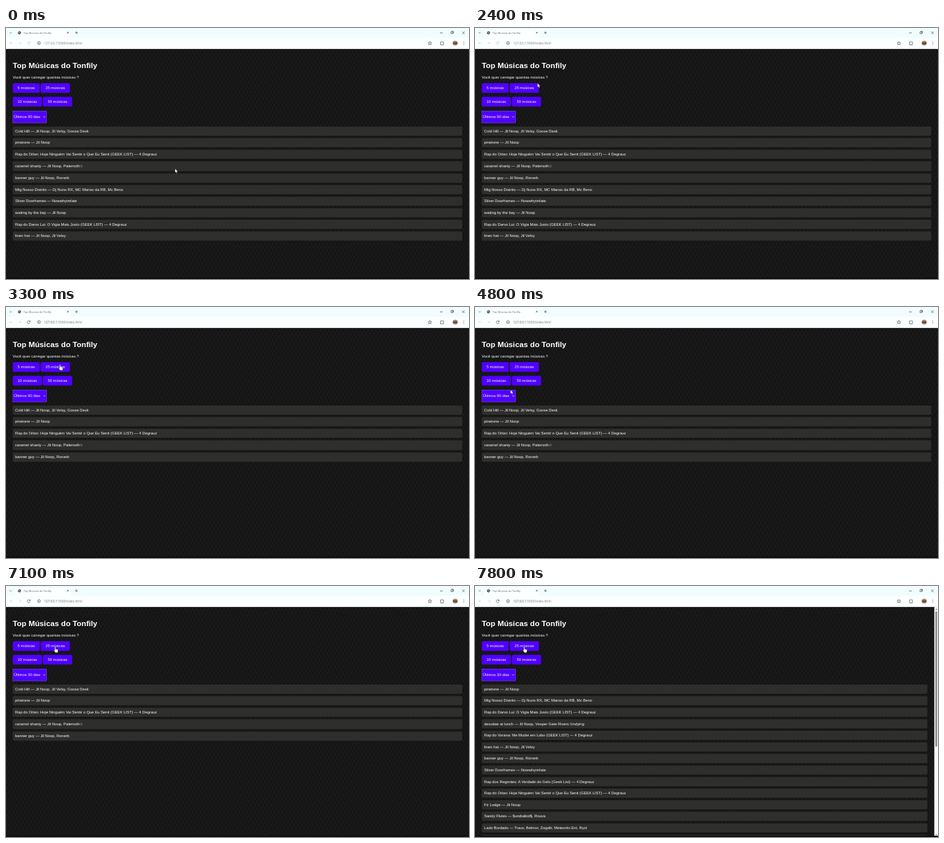
Recreate the animation shown at these times as an HTML page. Size 704 px wide and 382 px high, loop 8000 ms.

```html
<!DOCTYPE html>
<html lang="pt-BR">
<head>
<meta charset="utf-8">
<title>Top Músicas</title>
<style>
html, body { margin: 0; width: 100%; height: 100%; overflow: hidden; background: #171717; }
#stage { position: absolute; left: 0; top: 0; width: 704px; height: 382px; overflow: hidden; }
/* laid out at 1920 px wide, shown at 704 */
#screen { position: absolute; left: 0; top: 0; width: 1920px; height: 1042px; transform: scale(.366667); transform-origin: 0 0;
  font: 16px/18px "Liberation Sans", Arial, sans-serif; color: #fff; }
#screen > * { position: absolute; white-space: nowrap; margin: 0; }
#page { left: 0; top: 87px; width: 1920px; height: 955px; overflow: hidden; background:
  repeating-linear-gradient(60deg, rgba(0,0,0,.2) 0 3px, transparent 3px 14px),
  repeating-linear-gradient(-60deg, rgba(0,0,0,.2) 0 3px, transparent 3px 14px), #191919; }
#page > * { position: absolute; left: 28px; margin: 0; }
h1 { top: 49.4px; font-size: 32px; line-height: 37px; }
#ask { top: 108px; }
.btn { height: 40px; line-height: 40px; padding: 0 20px; border-radius: 5px; background: #5000ff; }
#period { top: 257px; width: 141px; height: 50px; line-height: 48px; padding-left: 4px; box-sizing: border-box;
  border: 1.5px solid #8d78d8; background: #5000ff; }
#period svg { position: absolute; right: 4px; top: 20px; }
#list { top: 322px; }
.row { height: 18px; padding: 10px; margin-bottom: 10px; border-radius: 5px; background: #2e2e2d; }
.row.tall { padding: 11.5px 10px; }
.ui { font-family: "Open Sans", "Noto Sans", sans-serif; }
#tab { left: 73px; top: 11px; font-size: 11px; color: #5d6264; }
#url { left: 158px; top: 54px; font-size: 13px; color: #70777b; }
svg { display: block; overflow: visible; }
#chrome, #bar, #cursor { position: absolute; left: 0; top: 0; }
#edge { position: absolute; left: 0; top: 380px; width: 704px; height: 2px; background: #13090d; }
</style>
</head>
<body>
<div id="stage">
  <svg id="chrome" width="704" height="32" fill="none" stroke="#40474a" stroke-width=".7">
    <rect width="704" height="32" fill="#fcffff" stroke="none"/>
    <rect width="704" height="15" fill="#f1fcfe" stroke="none"/>
    <path d="M14 15V6q0-3 3-3H95q3 0 3 3V15Z" fill="#fbffff" stroke="none"/>
    <path d="M5.8 6.7 7.2 8.1 8.6 6.7M92.7 5.8l2.6 2.6m0-2.6-2.6 2.6M105 7.2h4.2M107.1 5.1v4.2"/>
    <circle cx="20.5" cy="7.3" r="2.4" fill="#454b4e" stroke="none"/>
    <path d="M18.9 6.6q1.5-.9 1.7.5t1.4.8" stroke="#e8f0f2"/>
    <path d="M660 7.5h4M676.7 5.9h2.7v2.7h-2.7zM677.7 5.9v-.9h2.7v2.7h-1M693.6 5.4l3.8 3.8m0-3.8-3.8 3.8"/>
    <path d="M9.5 23H5.9m1.6-1.7L5.8 23l1.7 1.7M19.5 23h3.6m-1.6-1.7 1.7 1.7-1.7 1.7" stroke="#cbd2d5"/>
    <path id="reload" d="M36.3 22.1A2.1 2.1 0 1 0 36.5 23.7M36.7 20.6V22.3H35"/>
    <circle cx="50.2" cy="23" r="2.2"/><path d="M50.2 22.7v1.5M50.2 21.6v.5"/>
    <path d="M644.5 20.4l.8 1.8 1.9.2-1.4 1.3.4 1.9-1.7-1-1.7 1 .4-1.9-1.4-1.3 1.9-.2z"/>
    <path d="M660.8 21.2h1.3q.3-1.4 1.4 0h1.6v1.6q1.3.4 0 1.4v1.5h-4.3z"/>
    <circle cx="683" cy="23" r="3.7" fill="url(#tone)" stroke="none"/>
    <path d="M696 21v.01M696 23v.01M696 25v.01" stroke-width="1" stroke-linecap="round"/>
    <defs><linearGradient id="tone" x2="0" y2="1"><stop stop-color="#cda66c"/><stop offset=".55" stop-color="#5c4030"/><stop offset="1" stop-color="#b9aca0"/></linearGradient></defs>
  </svg>
  <div id="screen">
    <div id="tab" class="ui">Top Musicas do Tonfily</div>
    <div id="url" class="ui"><span id="host">127.0.0.1</span>:5500/index.html</div>
    <div id="page">
      <h1>Top Músicas do Tonfily</h1>
      <p id="ask">Você quer carregar quantas músicas ?</p>
      <div class="btn" style="top:142px">5 músicas</div>
      <div class="btn" style="top:142px;left:144px">25 músicas</div>
      <div class="btn" style="top:199px">10 músicas</div>
      <div class="btn" style="top:199px;left:153px">50 músicas</div>
      <div id="period"><span id="days"></span><svg width="10" height="8" fill="none" stroke="#fff" stroke-width="2"><path d="M1 2l4 4 4-4"/></svg></div>
      <div id="list"></div>
    </div>
  </div>
  <svg id="bar" width="704" height="382">
    <rect x="698.4" y="32" width="5.6" height="350" fill="#fafafa"/>
    <rect x="700" y="38.5" width="2.7" height="206" rx="1.3" fill="#8a8a8a"/>
    <path d="M699.9 36.3h2.9l-1.45-2zM699.9 377.7h2.9l-1.45 2z" fill="#777"/>
  </svg>
  <div id="edge"></div>
  <svg id="cursor" width="8" height="11" fill="#fff" stroke="#111" stroke-width=".4" stroke-linejoin="round">
    <path id="arrow" d="M0 0V6.3L1.5 5 2.5 7.2 3.5 6.7 2.6 4.6H4.5Z"/>
    <path id="hand" d="M2.1.3C2.8.3 3 .8 3 1.3V3.5l2.6.6c.8.2 1 .7.9 1.4L5.9 9H2.5L.4 6C0 5.3.7 4.8 1.2 5.2l.2.2V1.3C1.4.8 1.6.3 2.1.3Z"/>
  </svg>
</div>
<script>
const $ = id => document.getElementById(id);
const LOOP = 8000, STEP = 100;
const A = 'Jil Noop', B = 'Jil Velsy', C = '4 Degrauz';

const songs = {
  cold: `Cold Hill — ${A}, ${B}, Goose Desk`,
  pine: `pinetone — ${A}`,
  orlan: `Rap do Orlan: Hoje Ninguém Vai Sentir o Que Eu Senti (GEEK LIST) — ${C}`,
  shanty: `caramel shanty — ${A}, Palemoth☆`,
  banner: `banner guy — ${A}, Ronerb`,
  mtg: 'Mtg Nosso Distrito — Dj Nuno RX, MC Manso da RB, Mc Beno',
  silver: 'Silver Doorframes — Nowwhyimlate',
  bay: `waiting by the bay — ${A}`,
  darvo: `Rap do Darvo Lui: O Vigia Mais Justo (GEEK LIST) — ${C}`,
  linen: `linen hat — ${A}, ${B}`,
  lunch: `desolate at lunch — ${A}, Vesper Gate Rivers Undying`,
  vorana: `Rap do Vorana: Me Mudei em Lobo (GEEK LIST) — ${C}`,
  regents: `Rap dos Regentes: A Verdade do Gelo (Geek List) — ${C}`,
  lodge: `Fir Lodge — ${A}`,
  flutes: 'Sandy Flutes — $undialkid$, Rouva',
  lado: 'Lado Bordado — Traux, Belmor, Zogalti, Meteorito Ent, Ryol',
  blank: ''
};
const pick = names => names.split(' ').map(n => songs[n]);
const quarter = pick('cold pine orlan shanty banner mtg silver bay darvo linen');
const month = pick('pine mtg darvo lunch vorana linen banner silver regents orlan lodge flutes lado blank');

// time, x, y, hand
const path = [
  [0, 257, 214], [300, 120, 54], [500, 18, 140], [900, 98, 294],
  [1400, 416.5, 73], [1800, 297, 90], [2000, 220, 97], [2300, 115, 81],
  [2500, 75, 87, 1], [2700, 46, 86, 1], [3200, 46, 86, 1],
  [3300, 80, 87.5, 1], [3700, 80, 88, 1], [4000, 93, 125],
  [4500, 86, 97, 1], [4600, 78, 105], [4800, 54, 126],
  [5400, 33.5, 149], [5500, 35.5, 150.5], [5600, 35.5, 150.5],
  [6000, 216, 223], [6300, 140, 61], [6600, 42, 134],
  [7000, 70, 99, 1], [7100, 72.7, 92.5, 1], [LOOP, 72.7, 92.5, 1]
];

function pointer(t) {
  const i = path.findIndex((p, k) => t < path[k + 1][0]);
  const [t0, x0, y0, hand] = path[i], [t1, x1, y1] = path[i + 1];
  const k = (t - t0) / (t1 - t0);
  return [x0 + (x1 - x0) * k, y0 + (y1 - y0) * k, hand];
}

function fillList(rows, width) {
  $('list').style.width = width + 'px';
  $('list').replaceChildren(...rows.map(text => {
    const row = document.createElement('div');
    row.className = text.includes('☆') ? 'row tall' : 'row';
    row.textContent = text;
    return row;
  }));
}

const show = (id, on) => $(id).style.display = on ? '' : 'none';
let shown = 0;

function draw(now) {
  const t = Math.floor(now % LOOP / STEP) * STEP;
  const count = t < 3300 ? 10 : t < 7700 ? 5 : 25;
  if (count !== shown) {
    shown = count;
    if (count === 25) fillList(month, 1848);
    else fillList(quarter.slice(0, count), 1864);
    show('bar', count === 25);
  }
  $('days').textContent = `Últimos ${t < 5700 ? 90 : 30} dias`;
  const active = t >= 2900;
  $('reload').style.stroke = active ? '#40474a' : '#c3cacd';
  $('host').style.color = active ? '#4a5054' : '';
  const [x, y, hand] = pointer(t);
  $('cursor').style.transform = `translate(${x}px, ${y}px)`;
  show('arrow', !hand);
  show('hand', hand);
}

function tick() {
  draw(performance.now());
  requestAnimationFrame(tick);
}
tick();
</script>
</body>
</html>
```
